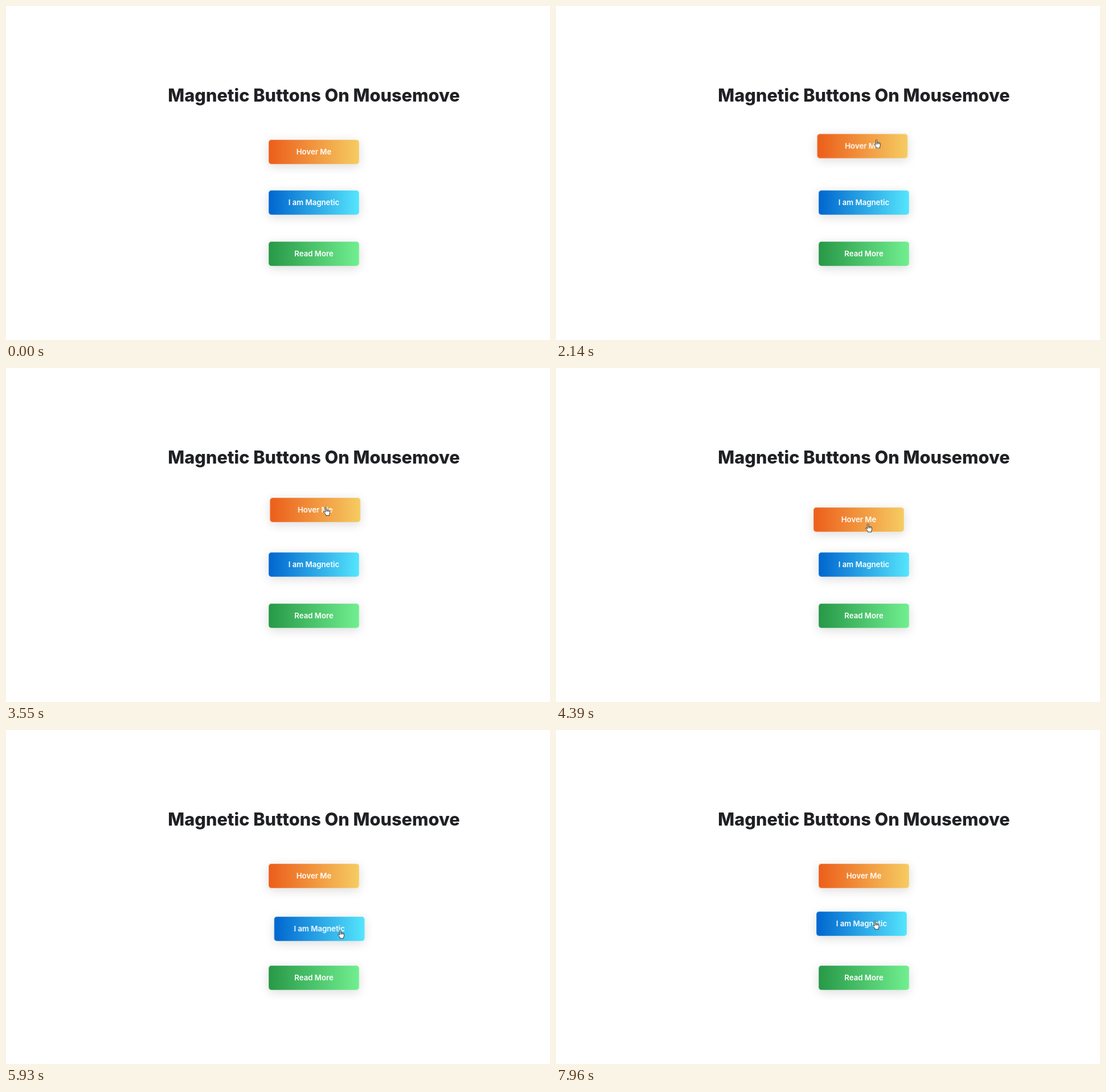
These frames come from a looping animation (955x587 px, 8000 ms). An HTML page:

```html
<!DOCTYPE html>
<html lang="en">
<head>
<meta charset="utf-8">
<title>Magnetic Buttons</title>
<style>
html, body { margin: 0; width: 100%; height: 100%; overflow: hidden; background: #fff; }
body { position: relative; font-family: Inter, "Open Sans", sans-serif; }

h1 {
  position: absolute; left: 240.5px; top: 137px; width: 600px; margin: 0;
  font-size: 30.7px; line-height: 40px; font-weight: 800;
  text-align: center; white-space: nowrap; color: #202124;
}
.btn {
  position: absolute; left: 461px; width: 159px; height: 43px; border-radius: 5px;
  box-shadow: 0 4px 18px rgba(0, 0, 0, .14), inset 0 0 0 1px rgba(255, 255, 255, .2);
  color: #fff; font-size: 13.2px; font-weight: 600; line-height: 43px; text-align: center;
}
.orange { top: 235px; background: linear-gradient(90deg, #ec5e1b, #f6cc62); }
.blue { top: 324px; background: linear-gradient(90deg, #0066cf, #55e5fc); }
.green { top: 414px; background: linear-gradient(90deg, #279847, #71ef90); }

.orange, .blue, .cursor { animation: 8s ease-in-out infinite; }
.orange { animation-name: orange; }
.blue { animation-name: blue; }
.cursor { position: absolute; left: 0; top: 0; width: 13px; height: 20px; overflow: visible; animation-name: cursor; }
.cursor path { stroke: #222; stroke-width: .9; stroke-linejoin: round; fill: #fff; }
.cursor .line { fill: none; }
.arrow { animation: arrow 8s step-end infinite; }
.hand { animation: hand 8s step-end infinite; }

@keyframes orange {
  0%, 12.8% { transform: none; }
  14.5% { transform: translate(6px, -2px); }
  18%, 18.88% { transform: translate(-1.5px, -7.5px); }
  21.2% { transform: translate(-4px, -6px); }
  23.3% { transform: translate(3px, -3px); }
  26.2% { transform: translate(-3px, -10px); }
  28.8% { transform: translate(1px, -13px); }
  31.2% { transform: translate(6px, 2px); }
  34.63%, 35.6% { transform: translate(.7px, 8px); }
  38.5% { transform: translate(-10px, 2px); }
  41% { transform: translate(-20px, -9px); }
  44.38%, 45.25% { transform: translate(2.3px, -7px); }
  47.5% { transform: translate(4px, -4px); }
  50.6% { transform: translate(-18px, 1px); }
  54.8% { transform: translate(-9px, 10px); }
  57.5% { transform: translate(-21px, 9px); }
  61%, 100% { transform: none; }
}
@keyframes blue {
  0%, 59.5% { transform: none; }
  62% { transform: translate(-13px, 3px); }
  64.5%, 65.38% { transform: translate(-8.7px, 1px); }
  68.5% { transform: translate(-24px, 3px); }
  72.5% { transform: translate(18px, 5px); }
  76.5% { transform: translate(-6px, 2px); }
  79.5% { transform: translate(-24px, -2px); }
  82% { transform: translate(8px, -4px); }
  83.75%, 84.63% { transform: translate(3px, -4.7px); }
  87% { transform: translate(12px, -4px); }
  90.2% { transform: translate(-14px, 0); }
  93.4% { transform: translate(13px, -3px); }
  97.5% { transform: translate(-15px, -5px); }
  99.5%, 100% { transform: translate(-4px, -5px); }
}
@keyframes cursor {
  0%, 3.12% { transform: translate(934px, 568px); }
  7.5% { transform: translate(742px, 394px); }
  12.8% { transform: translate(597px, 259px); }
  14.5% { transform: translate(580px, 248px); }
  18%, 18.88% { transform: translate(564.5px, 237px); }
  21.2% { transform: translate(556px, 241px); }
  23.3% { transform: translate(573px, 248px); }
  26.2% { transform: translate(557px, 235px); }
  28.8% { transform: translate(566px, 228px); }
  31.2% { transform: translate(560px, 262px); }
  34.63%, 35.6% { transform: translate(491.5px, 289px); }
  38.5% { transform: translate(472px, 240px); }
  41% { transform: translate(505px, 196px); }
  44.38%, 45.25% { transform: translate(557px, 244px); }
  47.5% { transform: translate(567px, 246px); }
  50.6% { transform: translate(526px, 257px); }
  54.8% { transform: translate(543px, 273px); }
  57.5% { transform: translate(528px, 290px); }
  61% { transform: translate(549px, 352px); }
  64.5%, 65.38% { transform: translate(558px, 349px); }
  68.5% { transform: translate(520px, 350px); }
  72.5% { transform: translate(598px, 353px); }
  76.5% { transform: translate(552px, 347px); }
  79.5% { transform: translate(518px, 341px); }
  82% { transform: translate(579px, 337px); }
  83.75%, 84.63% { transform: translate(569.5px, 335px); }
  87% { transform: translate(587px, 338px); }
  90.2% { transform: translate(536px, 345px); }
  93.4% { transform: translate(589px, 339px); }
  97.5% { transform: translate(534px, 335px); }
  99.5%, 100% { transform: translate(555.5px, 335px); }
}
@keyframes arrow {
  0% { opacity: 0; }
  3.12% { opacity: 1; }
  12.75%, 100% { opacity: 0; }
}
@keyframes hand {
  0% { opacity: 0; }
  12.75%, 100% { opacity: 1; }
}
</style>
</head>
<body>
<h1>Magnetic Buttons On Mousemove</h1>
<div class="btn orange">Hover Me</div>
<div class="btn blue">I am Magnetic</div>
<div class="btn green">Read More</div>
<svg class="cursor" viewBox="0 0 13 20">
  <path class="arrow" d="M.5.5v15l3.4-3.2 2.3 5.5 2.3-1-2.3-5.3h4.9z"/>
  <g class="hand">
    <path d="M3.5 9.7V1.7a1.1 1.1 0 0 1 2.2 0v4.6a1 1 0 0 1 2 .2a1 1 0 0 1 2 .4a.95.95 0 0 1 1.8.5v3.2c0 1.6-1 2.2-1 3.4v1.3H4.6v-1.2C4.2 13 1.6 10.7.7 9.2c-.5-.9.6-1.7 1.4-1z"/>
    <path class="line" d="M5.7 6v2.6M7.7 6.6v2M9.7 7v1.7"/>
  </g>
</svg>
</body>
</html>
```
